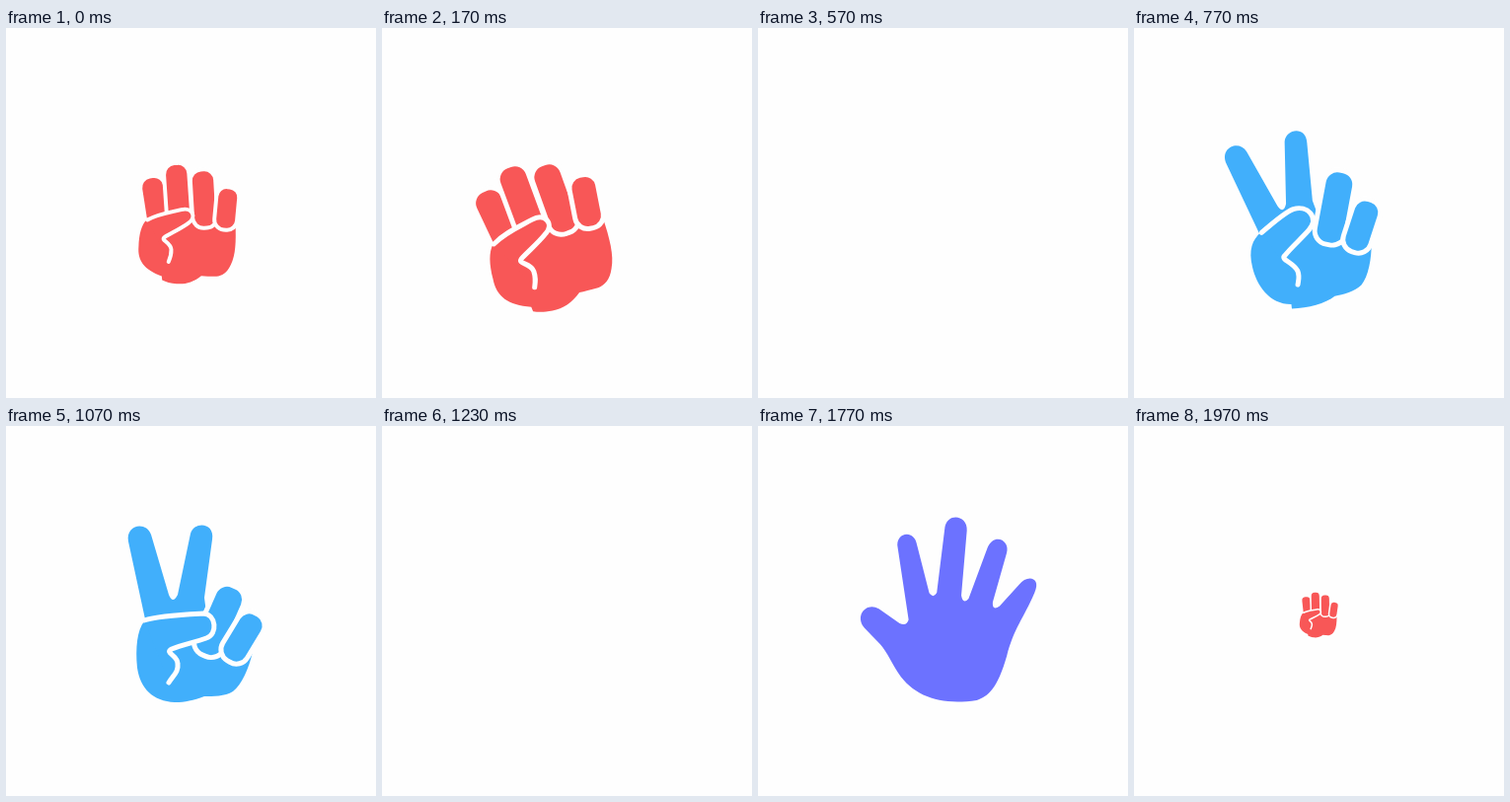
An HTML page for the animation above (2010 ms loop, 375 by 375 pixels).

```html
<!DOCTYPE html>
<html lang="en">
<head>
<meta charset="utf-8">
<title>Rock, scissors, paper</title>
<style>
  html, body { margin: 0; width: 100%; height: 100%; overflow: hidden; background: #fefefe; }
  svg { display: block; width: 100vw; height: 100vh; }
</style>
</head>
<body>
<svg viewBox="0 0 375 375"></svg>
<script>
const PAPER = '#fefefe', LOOP = 2010, STEP = 1000 / 30, STEPS = 20, CENTER = 187.5;
const svg = document.querySelector('svg');

// Fingers: [tip x, tip y, base x, base y, width, early shift x, early shift y].
// Palms and thumbs: outline early and late in the swing.
const hands = [
  {
    color: '#f85757', pivot: [200, 270], rest: 12,
    back: [[129.5, 165.5, 139, 203, 27, -1, -3], [161, 155, 168, 198, 27, -4, -12]],
    palm: [
      'M124 203C140 196 160 195 182 195L200 200L238 198C241 220 242 238 237 250C233 262 227 265 220 267Q208 268 200.5 268C191 277 181 281 170 281C162 281 156 280 151 278L150 273C127 267 117 256 117 238C116 222 118 210 124 203Z',
      'M125 205C140 196 160 195 182 195L200 200L243 198C245 220 245 241 238 258C233 267 226 269 219 270Q208 271 200 271C191 279 182 282 172 282C162 282 153 279 145 276L144.5 275.8C127 269 119 256 119 238C119 223 121 213 125 205Z'
    ],
    front: [[194.5, 156.5, 201, 199, 27, -3, -8.5], [228, 168, 228, 194, 24, -3, -2]],
    thumb: [
      'M125 203C138 194 152 191 167 186C181 181 188 194 178 202C169 210 157 217 149 223C144 228 157 228 159 238C160 245 159 248 157 254',
      'M124 206C138 196 160 194 180 193C195 193 200 209 190 215C180 222 165 222 155 227C148 231 162 232 162 242C161 250 158 253 155 258'
    ]
  },
  {
    color: '#41affb', pivot: [195, 262], rest: 13,
    back: [],
    fork: 'M124 117C121 100 142 96 147 110L165 171Q169 181 174 171L187 109C191 96 212 98 209 115L201 174L204 197L143 205Z',
    palm: [
      'M143 193C160 192 185 191 205 191L250 229C246 246 239 262 230 269C222 274 210 274 201 274C190 279 172 280 155.5 276.5L156 272C134 267 126 245 126 226C126 208 132 199 143 193Z',
      'M140 198C160 192 185 191 205 191L250 229C246 246 239 262 230 269C222 274 210 274 201 274C190 278 181 280 172 280L171 280C149 279 136 266 133 245C131 225 133 207 140 198Z'
    ],
    front: [[225, 177, 207, 218, 27, 5.5, -11.5], [247, 203, 233, 226, 24, 4, -4]],
    thumb: [
      'M143 194C158 186 172 179 180 178C195 177 204 192 191 202C183 208 168 216 161 222C155 225 167 230 170 240C171 246 169 249 167 254',
      'M140 197C155 192 180 191 200 190C213 191 215 211 203 215C192 219 178 222 168 226C160 230 174 232 174 241C175 249 170 252 165 260'
    ]
  },
  {
    color: '#6c72ff', pivot: [198, 267], rest: 7,
    open: 'M97 220.5L122 226Q130 226 129 219L91 156C82 143 99 131 108 146L138 186Q144 190 145 183L127 118C124 103 144 98 149 113L169 176Q174 184 177 176L175 121C175 104 194 105 195 119L201 170Q204 179 209 171L219 143C222 131 237 127 236.5 145C236 175 231 185 235 215C239 250 233 260 224 268C195 286 165 290 140 273C130 266 122 258 112 253L91 244C76 236 83 218 97 220.5Z'
  }
];

const clamp = v => Math.min(1, Math.max(0, v));
const lerp = (a, b, m) => a + (b - a) * m;

// Swing from the middle to the left, then all the way to the right.
function swing(k) {
  const turn = 8.3;
  if (k < turn) return 19.5 * (1 - (k / turn) ** 1.6) ** 4.3;
  return 16.5 * (1 - Math.cos(Math.PI * (k - turn) / 9.2));
}

function morph([from, to], m) {
  const target = to.match(/[\d.]+/g);
  let i = 0;
  return from.replace(/[\d.]+/g, n => lerp(+n, +target[i++], m).toFixed(2));
}

const shape = (d, fill, extra = '') => `<path d="${d}" fill="${fill}" ${extra}/>`;

// A rounded bar with a gap of background around it.
function finger([x1, y1, x2, y2, width, dx, dy], color, m) {
  const length = Math.hypot(x2 - x1, y2 - y1) + width;
  const tilt = Math.atan2(y2 - y1, x2 - x1) * 180 / Math.PI - 90;
  const x = x1 + dx * (1 - m), y = y1 + dy * (1 - m);
  const bar = (gap, fill) => `<rect x="${-width / 2 - gap}" y="${-width / 2 - gap}" width="${width + 2 * gap}" height="${length + 2 * gap}" rx="${width * 0.43 + gap}" fill="${fill}"/>`;
  return `<g transform="translate(${x} ${y}) rotate(${tilt})">${bar(5, PAPER)}${bar(0, color)}</g>`;
}

function folded({ color, back, fork, palm, front, thumb }, k) {
  const p = clamp((k - 5) / 7), m = p * p * (3 - 2 * p);
  const fingers = list => list.map(f => finger(f, color, m)).join('');
  return fingers(back)
    + (fork ? shape(fork, color) : '')
    + shape(morph(palm, m), color)
    + fingers(front)
    + shape(morph(thumb, m), color,
      `stroke="${PAPER}" stroke-width="5" stroke-linecap="round" stroke-linejoin="round"`);
}

function drawHand(hand, k) {
  const body = hand.open ? shape(hand.open, hand.color) : folded(hand, k);
  const scale = 1 - 0.7 * 0.3 ** k;
  const angle = swing(k) - swing(hand.rest);
  return `<g transform="translate(${CENTER} ${CENTER}) scale(${scale}) translate(${-CENTER} ${-CENTER}) rotate(${angle} ${hand.pivot})">${body}</g>`;
}

function render(time) {
  const step = Math.min(59, Math.floor((time % LOOP + 8) / STEP)) + 1;
  const k = step % STEPS;
  const hand = hands[Math.floor(step / STEPS) % hands.length];
  svg.innerHTML = k < 18 ? drawHand(hand, k) : '';
}

const start = performance.now();
function tick() {
  render(performance.now() - start);
  requestAnimationFrame(tick);
}
tick();
</script>
</body>
</html>
```
